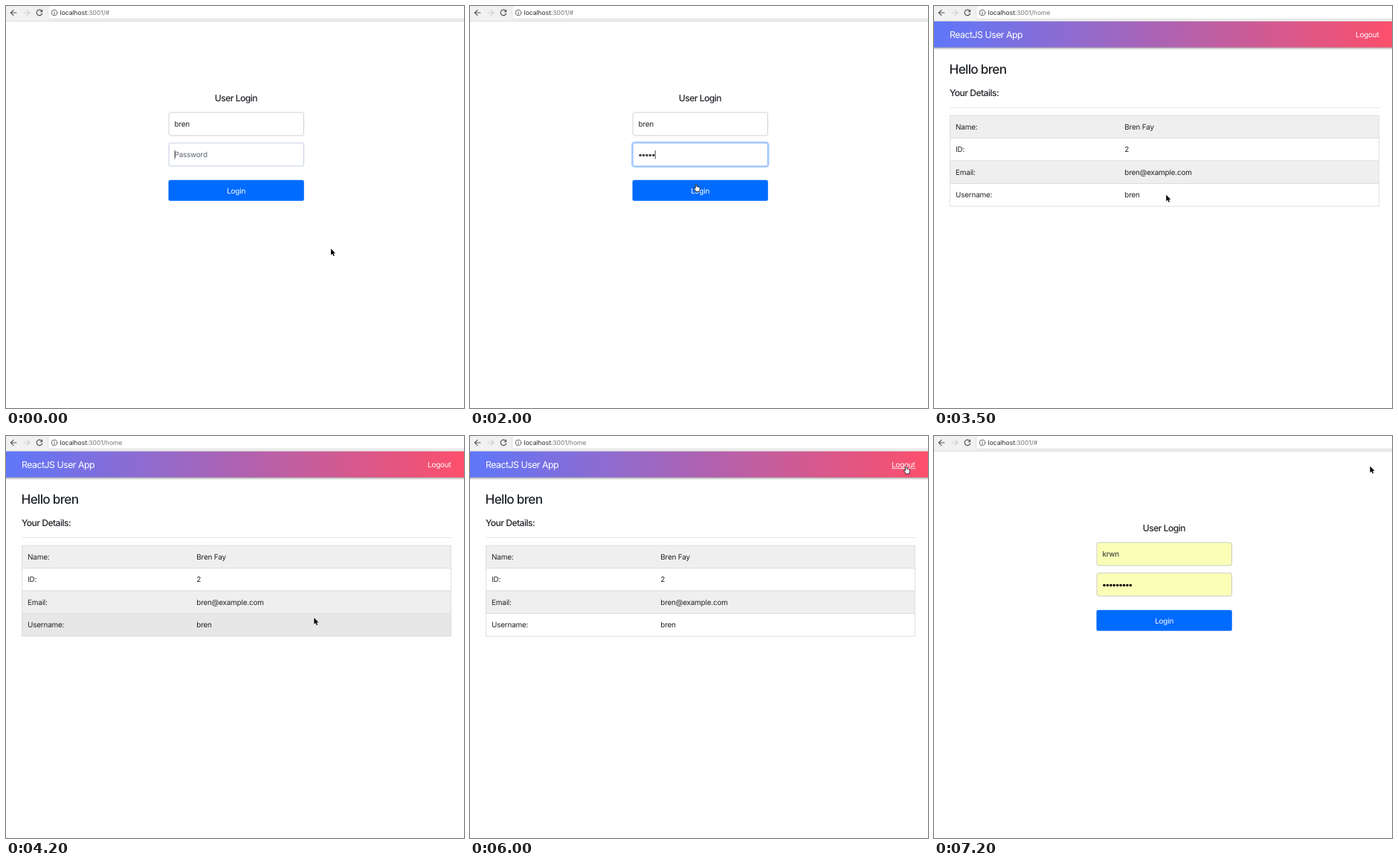
These frames come from a looping animation (616x540 px, 7.4 s). An HTML page:

```html
<!DOCTYPE html>
<html lang="en">
<head>
<meta charset="utf-8">
<title>User login</title>
<style>
html, body { margin: 0; width: 100%; height: 100%; overflow: hidden; background: #fff; }
svg { display: block; width: 616px; height: 540px; }
text { font: 9.95px Inter, "Open Sans", sans-serif; letter-spacing: -.021em; fill: #212529; text-rendering: geometricPrecision; white-space: pre; }
.url { font-size: 8.5px; letter-spacing: 0; }
.h5 { font-size: 12.1px; font-weight: 500; letter-spacing: -.044em; }
.h3 { font-size: 17.2px; font-weight: 500; letter-spacing: -.042em; }
.brand { font-size: 12.4px; letter-spacing: -.043em; }
.menu text { font-size: 7.9px; letter-spacing: -.005em; fill: #111; }
.mid { text-anchor: middle; }
.white { fill: #fff; }
.field { fill: #fff; stroke: #cdd1d6; }
.auto { fill: #faffb8; stroke: #c9ccc4; }
</style>
</head>
<body>
<svg viewBox="0 0 616 540">
  <defs>
    <linearGradient id="sky">
      <stop offset="0" stop-color="#5f77fa"/>
      <stop offset="1" stop-color="#fc4f6b"/>
    </linearGradient>
    <linearGradient id="shade" x2="0" y2="1">
      <stop offset="0" stop-color="#000" stop-opacity=".38"/>
      <stop offset="1" stop-color="#000" stop-opacity="0"/>
    </linearGradient>
  </defs>
  <rect width="616" height="540" fill="#fff"/>

  <g id="login">
    <text class="h5 mid" x="309.4" y="127.9">User Login</text>
    <rect id="user" class="field" x="219" y="143" width="181.5" height="31" rx="2.5"/>
    <text id="userText" x="226.5" y="162"></text>
    <rect id="glow" x="218" y="183" width="183.5" height="33" rx="3.5" fill="none" stroke="#8dbbff" stroke-opacity=".6" stroke-width="2.4"/>
    <rect id="pass" class="field" x="219" y="184" width="181.5" height="31" rx="2.5"/>
    <text id="hint" x="226.5" y="203" style="fill:#5d646b">Password</text>
    <g id="dots"></g>
    <rect id="caret" y="194" width=".9" height="11.5" fill="#333"/>
    <rect x="218.5" y="233.8" width="182.3" height="28" rx="2.5" fill="#006bff"/>
    <text class="mid white" x="309.6" y="251.8">Login</text>
    <g id="menu" class="menu">
      <path d="M219 215.8H400.5V260.6H219Z" fill="#fff" stroke="#b4c9e8" stroke-width=".8"/>
      <path d="M219.5 261.2H400" stroke="#2e6fc4" stroke-width="1.1"/>
      <text x="223.8" y="226.6">Use password for:</text>
      <text x="223.8" y="241.5">krwn</text>
      <text x="223.8" y="256.4">bren</text>
    </g>
  </g>

  <g id="home">
    <rect y="55" width="616" height="4" fill="url(#shade)"/>
    <rect y="20" width="616" height="35.6" fill="url(#sky)"/>
    <text class="brand white" x="21" y="42.6">ReactJS User App</text>
    <text class="white" x="567" y="42">Logout</text>
    <path id="line" d="M567 43.7H599" stroke="#fff" stroke-width=".8"/>
    <text class="h3" x="20.6" y="91.2">Hello bren</text>
    <text class="h5" x="21" y="121.2">Your Details:</text>
    <path d="M21 136.4H599" stroke="#e4e4e4"/>
    <g id="rows"></g>
  </g>

  <g id="bar" fill="none" stroke-linecap="round" stroke-linejoin="round">
    <rect width="616" height="20" fill="#f1f1f1"/>
    <path d="M0 20.3H616" stroke="#d4d4d4" stroke-width=".9"/>
    <rect x="56.7" y="-.5" width="570" height="18" rx="2" fill="#fff" stroke="#d6d6d6" stroke-width=".8"/>
    <path d="M14 9H6.6M10 5.4L6.4 9L10 12.6" stroke="#555" stroke-width="1.1"/>
    <path d="M24.3 9H31.7M28.3 5.4L31.9 9L28.3 12.6" stroke="#cfcfcf" stroke-width="1.1"/>
    <path d="M47.8 6.3A3.8 3.8 0 1 0 48.6 10" stroke="#555" stroke-width="1.2"/>
    <path d="M49.2 4.6V8.2H45.6Z" fill="#555"/>
    <circle cx="65" cy="9" r="3.8" stroke="#555" stroke-width=".9"/>
    <path d="M65 8.7V11M65 6.9V7" stroke="#555"/>
    <text class="url" x="72.6" y="12.2">localhost<tspan id="path" fill="#777"></tspan></text>
  </g>

  <g id="cursor">
    <path id="arrow" d="M0 0V8.6L2 6.8L3.4 9.9L4.8 9.3L3.4 6.3H6.1Z" fill="#000" stroke="#fff" stroke-width=".8" paint-order="stroke"/>
    <g id="beam" fill="none" stroke-linecap="round">
      <path id="stem" d="M-1.8 -4.6Q0 -4.6 0 -3.4V3.4Q0 4.6 -1.8 4.6M1.8 -4.6Q0 -4.6 0 -3.4M0 3.4Q0 4.6 1.8 4.6M-1 1.4H1" stroke="#222" stroke-width=".95"/>
    </g>
    <path id="hand" d="M-.9 .7Q0 -.7 .8 .7V3.6Q1.8 3 2.4 3.9Q3.4 3.5 3.9 4.4Q5.2 4.2 5.2 5.6Q5.2 8 4.2 9V10.4H-.6V9.2Q-2 7.6 -3.2 5.9Q-2.9 4.6 -.9 6Z" fill="#fff" stroke="#111" stroke-width=".85" stroke-linejoin="round"/>
  </g>
</svg>
<script>
const LOOP = 7400, STEP = 100;
const ENTER = 3400, LEAVE = 6500;
const MENU_ON = 900, MENU_OFF = 1200, TYPE = 200;
const ROW_TOP = 147, ROW = 30.5;

// time, x, y of the pointer's hot spot
const track = [
  [0, 437, 326], [100, 437, 326], [400, 292, 205], [800, 288.5, 207],
  [1400, 288.5, 207], [2200, 307, 245], [2800, 307, 245], [3100, 310, 234.5],
  [3300, 310, 235], [3500, 312.3, 253.6], [4100, 400, 252], [4600, 538, 177.5],
  [5100, 579, 47], [5500, 586.5, 40.6], [LOOP, 586.5, 40.6]
];
const details = [['Name:', 'Bren Fay'], ['ID:', '2'], ['Email:', 'bren@example.com'], ['Username:', 'bren']];

const $ = id => document.getElementById(id);
const show = (id, on) => { $(id).style.display = on ? '' : 'none'; };
const clamp = v => Math.min(1, Math.max(0, v));

function add(parent, tag, attrs, text) {
  const el = document.createElementNS('http://www.w3.org/2000/svg', tag);
  for (const k in attrs) el.setAttribute(k, attrs[k]);
  if (text) el.textContent = text;
  return parent.appendChild(el);
}

const rows = details.map(([label, value], i) => {
  const y = ROW_TOP + i * ROW;
  const box = add($('rows'), 'rect', { x: 21.5, y, width: 577, height: ROW, stroke: '#dcdcdc', 'stroke-width': .9 });
  add($('rows'), 'text', { x: 29, y: y + 18.8 }, label);
  add($('rows'), 'text', { x: 256.3, y: y + 18.8 }, value);
  return box;
});
const dots = Array.from({ length: 9 }, (_, i) =>
  add($('dots'), 'circle', { cx: 229 + i * 4.42, cy: 200.5, r: 1.75 }));

function pointer(t) {
  const i = Math.max(1, track.findIndex(k => k[0] > t));
  const [t0, x0, y0] = track[i - 1], [t1, x1, y1] = track[i];
  const p = clamp((t - t0) / (t1 - t0)), e = p * p * (3 - 2 * p);
  return [x0 + (x1 - x0) * e, y0 + (y1 - y0) * e];
}

function shape(x, y, home) {
  if (home) return x > 566 && x < 600 && y > 32 && y < 46 ? 'hand' : 'arrow';
  if (x < 219 || x > 401) return 'arrow';
  if ((y > 143 && y < 174) || (y > 184 && y < 215)) return 'beam';
  return y > 233 && y < 262 ? 'hand' : 'arrow';
}

function drawLogin(t) {
  const filled = t >= LEAVE;
  const typed = filled ? 9 : Math.min(9, Math.max(0, Math.floor((t - 1000) / TYPE)));
  const focus = filled ? 0 : clamp(.12 + t / 220);
  $('userText').textContent = filled ? 'krwn' : 'bren';
  for (const id of ['user', 'pass']) $(id).setAttribute('class', filled ? 'auto' : 'field');
  $('pass').style.stroke = filled ? '' : `rgb(${205 - 75 * focus},${209 - 30 * focus},${222 + 30 * focus})`;
  $('glow').style.opacity = focus > .2 ? focus : 0;
  show('hint', typed === 0);
  dots.forEach((d, i) => { d.style.display = i < typed ? '' : 'none'; });
  $('dots').setAttribute('fill', filled ? '#000' : '#3d4248');
  const blinkOff = (t >= 600 && t < 1100) || t >= 3300;
  show('caret', !filled && !blinkOff);
  $('caret').setAttribute('x', 226.6 + typed * 4.42);
  show('menu', t >= MENU_ON && t < MENU_OFF);
}

function draw(t) {
  const home = t >= ENTER && t < LEAVE;
  const [x, y] = pointer(t), kind = shape(x, y, home);
  show('home', home);
  show('login', !home);
  $('path').textContent = home ? ':3001/home' : ':3001/#';
  if (home) {
    const over = t > 3500 ? Math.floor((y - ROW_TOP) / ROW) : -1;
    rows.forEach((r, i) => r.setAttribute('fill', i === over ? '#e7e7e7' : i % 2 ? '#fff' : '#efefef'));
    show('line', kind === 'hand');
  } else drawLogin(t);
  for (const k of ['arrow', 'beam', 'hand']) show(k, k === kind);
  $('cursor').setAttribute('transform', `translate(${x} ${y})`);
}

const start = performance.now();
function tick() {
  const t = (performance.now() - start) % LOOP;
  draw(Math.floor(t / STEP) * STEP);
  requestAnimationFrame(tick);
}
tick();
</script>
</body>
</html>
```
